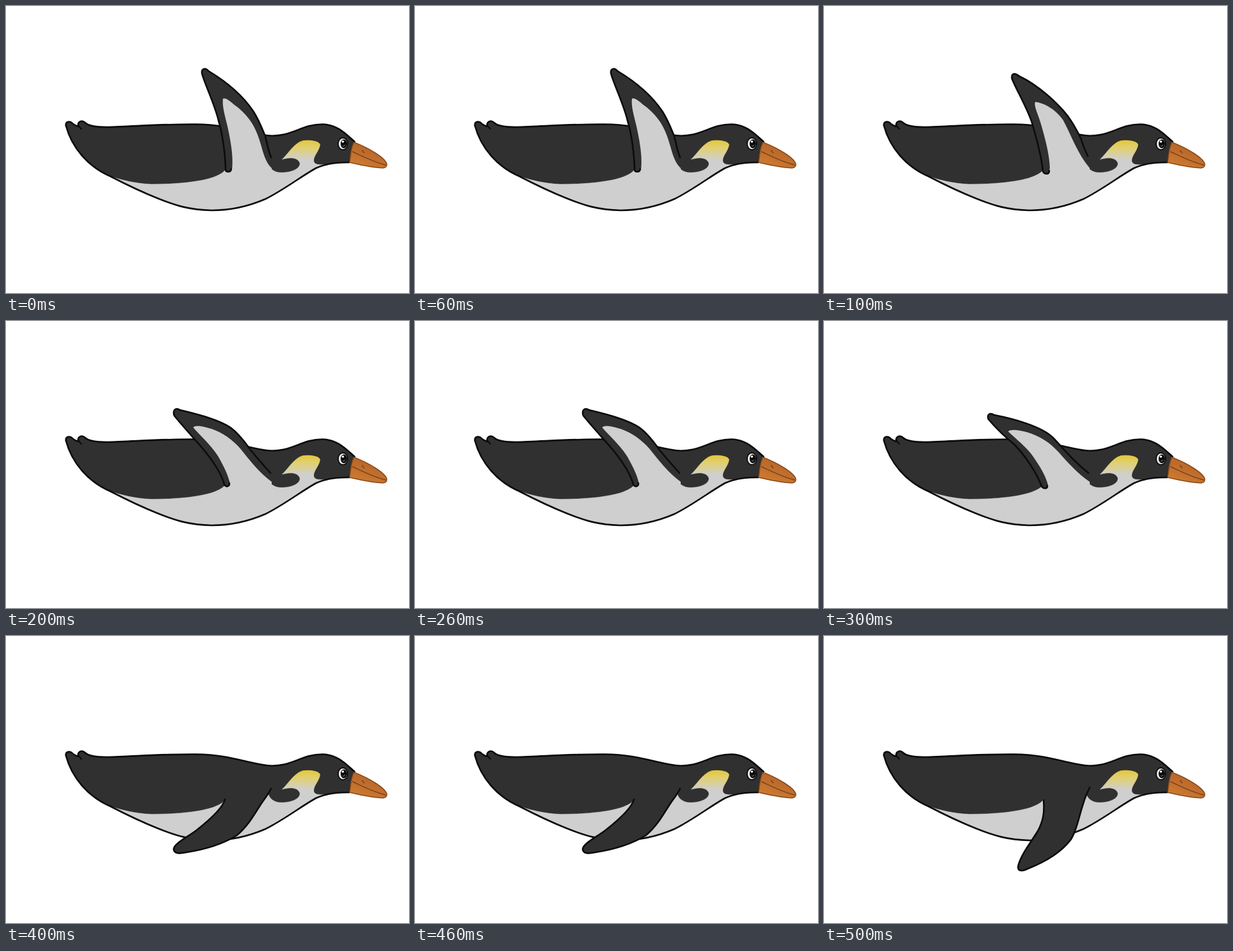
Write an HTML page that moves like this. It is 637x455 px and loops after 600 ms.

```html
<!DOCTYPE html>
<html lang="en">
<head>
<meta charset="utf-8">
<title>Swimming penguin</title>
<style>
  html, body { margin: 0; width: 100%; height: 100%; overflow: hidden; background: #fff; }
  svg { display: block; width: 100%; height: 100%; }
  .line { fill: none; stroke: #0b0b0b; stroke-width: 2.6; stroke-linecap: round; stroke-linejoin: round; }
  .dark { fill: #303030; }
  .light { fill: #cfcfcf; }
</style>
</head>
<body>
<svg viewBox="0 0 637 455">
  <defs>
    <path id="body" d="M94.500 189C94.500 182 102 182 106 187Q110 190 114 191C113 183 120 180 125 185C130 190 140 192 160 192C200 191 250 187 300 187.500C338 188 360 194 385 200C407 205 420 208 440 203.500C460 199 475 187.500 500 187.500C525 188 538 204 551 215L543 248C520 247.500 505 250 490 257C465 271 440 291 410 306C380 319 350 324 325 324C290 323 270 317 240 305C215 295 190 283 165 270C130 255 104 225 94.500 189Z"/>
    <clipPath id="inside"><use href="#body"/></clipPath>
    <linearGradient id="bib" gradientUnits="userSpaceOnUse" x1="0" y1="212" x2="0" y2="244">
      <stop stop-color="#e2c63a"/>
      <stop offset=".4" stop-color="#e1d070"/>
      <stop offset="1" stop-color="#cfcfcf"/>
    </linearGradient>
    <linearGradient id="beak" gradientUnits="userSpaceOnUse" x1="572" y1="226" x2="562" y2="252">
      <stop stop-color="#b9682b"/>
      <stop offset="1" stop-color="#cb7830"/>
    </linearGradient>
    <filter id="soft"><feGaussianBlur stdDeviation=".7"/></filter>
  </defs>

  <use href="#body" class="dark"/>
  <g clip-path="url(#inside)">
    <path fill="url(#bib)" stroke="#1c1c1c" stroke-opacity=".45" filter="url(#soft)" d="M160 268C185 276 205 281 230 282C270 282 310 278 330 270Q345 264 347 258L415 250C417 258 424 263 434 263.500C448 264 465 259 464 249C461 240 448 240 435 244C446 234 455 217 469 213C482 211 496 214 497 220C495 231 486 238 487 246C488 251 494 251 502 251L520 260L440 340H240Z"/>
  </g>
  <use href="#body" class="line"/>
  <path class="line" d="M114 189L119 195" style="stroke-width:2"/>

  <path fill="url(#beak)" stroke="#8a4a18" stroke-width="1.500" stroke-linejoin="round" d="M550 216C575 226 600 241 602 251C602 258 595 257 585 256C570 254 555 251 543 248C545 240 544 229 550 216Z"/>
  <path fill="none" stroke="#75411c" stroke-width="1.500" stroke-linecap="round" d="M548 231C565 239 580 247 600 252M563 229L566 233"/>

  <ellipse cx="532.500" cy="218.500" rx="7.500" ry="9.500" fill="#e8e8e8" stroke="#0b0b0b" stroke-width="1.800"/>
  <ellipse cx="534" cy="218.500" rx="5" ry="7" fill="#0b0b0b"/>
  <circle cx="532.500" cy="215" r="1.800" fill="#fff"/>
  <path fill="none" stroke="#888" d="M532 222Q535 223 536 220"/>

  <path id="wing" class="dark"/>
  <path id="under" class="light" filter="url(#soft)"/>
  <path id="edge" class="line"/>
</svg>
<script>
// Each pose: trailing edge and tip, leading edge, then the pale underside if raised.
const raised = (rear, front, pale) => ({
  edge: rear + front,
  wing: rear + front + "L420 257L357 257Z",
  under: pale + "L420 280H357Z"
});
const lowered = d => ({ edge: d, wing: d + "L347 248Z", under: "" });

const poses = [
  raised(
    "M356 258C356 264 348 264 347 260C347 240 343 205 336 182C330 156 315 126 310 108C308 99 315 97 320 103",
    "C350 121 375 143 391 167C401 183 405 195 410 207C413 220 415 231 419 240",
    "M357 261C360 240 355 214 351 195C348 180 341 160 343 147C347 145 353 150 360 156C380 170 391 186 398 205C406 227 408 246 420 257"),
  raised(
    "M356 261C356 268 348 267 346 262C344 240 336 210 329 186C322 163 303 131 297 115C296 106 302 106 308 111",
    "C340 126 370 155 385 174C396 189 401 200 406 210Q410 224 417 238",
    "M357 263C358 240 349 208 342 184C338 171 331 157 334 152C350 154 368 166 378 181C390 203 401 235 420 257"),
  raised(
    "M353 257C354 264 346 263 345 259C340 240 325 219 310 201C299 188 276 163 266 150C263 141 268 137 275 141",
    "C294 146 332 154 355 169C371 181 380 196 387 205C401 222 410 232 418 241",
    "M355 262C352 245 344 230 335 214C322 194 306 181 296 169C298 164 312 167 325 171C344 178 358 188 371 203C386 222 400 240 420 255"),
  raised(
    "M353 261C354 267 346 266 344 262C336 241 319 214 300 195C290 187 273 171 260 156C257 148 262 145 269 149",
    "C300 155 343 167 361 184C374 197 391 220 418 241",
    "M355 265C352 247 342 232 332 217C321 200 302 186 291 175C296 171 308 173 320 176C341 182 357 193 370 207C386 225 400 241 420 255"),
  lowered("M346 259C343 272 325 289 301 308C285 320 266 329 265 338C266 346 275 345 285 343C311 339 341 331 365 316C384 300 394 280 404 265C411 255 415 250 419 242"),
  lowered("M347 260C349 280 346 294 338 309C328 326 312 345 307 364C305 374 314 373 322 369C350 358 374 344 390 323C400 308 403 285 410 265C413 255 416 248 420 240")
];

const parts = ["wing", "under", "edge"].map(id => document.getElementById(id));

function draw(now) {
  const pose = poses[Math.floor(now / 100) % poses.length];
  for (const part of parts) part.setAttribute("d", pose[part.id]);
  requestAnimationFrame(draw);
}
draw(performance.now());
</script>
</body>
</html>
```
